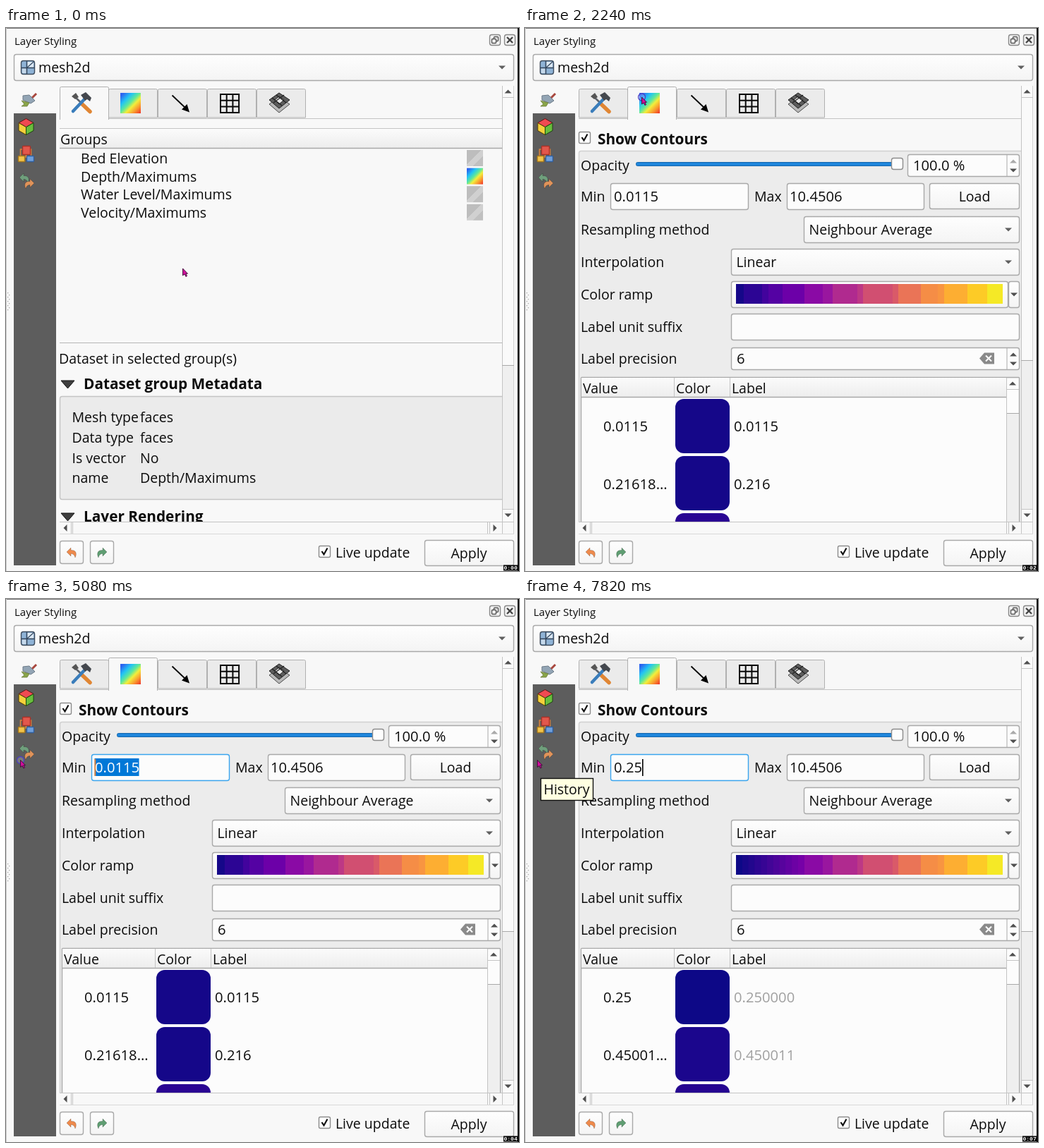
These frames come from a looping animation (727 px wide and 770 px high, 8 s). An HTML page:

```html
<!DOCTYPE html>
<html lang="en">
<head>
<meta charset="utf-8">
<title>Layer Styling</title>
<style>
  html, body { margin: 0; width: 100%; height: 100%; overflow: hidden; background: #f8f8f8; }
  svg { display: block; width: 727px; height: 770px; }
  text { font: 19.5px "Open Sans", "Noto Sans", sans-serif; fill: #0c0c0c; white-space: pre; }
  .num { font-size: 20.2px; }
  .bold { font-size: 20.8px; font-weight: 700; }
  .title { font-size: 15px; }
  .clock { font: 700 8px "Liberation Mono", monospace; fill: #fff; }
  .mid { text-anchor: middle; }
</style>
</head>
<body>
<svg id="stage" viewBox="0 0 727 770"></svg>
<script>
const LINE = '#a9a9a9', SOFT = '#c4c4c4', BG = '#f8f8f8', PANEL = '#ececec', FIELD = '#fcfcfc';

// Markup helpers
const attrs = o => Object.entries(o).map(([k, v]) => ` ${k}="${v}"`).join('');
const rect = (x, y, w, h, fill, stroke = 'none', rx = 0, more = {}) =>
  `<rect${attrs({ x, y, width: w, height: h, fill, stroke, rx, ...more })}/>`;
const box = (x, y, x2, y2, fill = FIELD, stroke = LINE, rx = 3, more = {}) =>
  rect(x + .5, y + .5, x2 - x - 1, y2 - y - 1, fill, stroke, rx, { 'stroke-width': 1.4, ...more });
const path = (d, fill = 'none', stroke = 'none', w = 1, more = {}) =>
  `<path${attrs({ d, fill, stroke, 'stroke-width': w, ...more })}/>`;
const line = (x1, y1, x2, y2, stroke = SOFT, w = 1) => path(`M${x1} ${y1}L${x2} ${y2}`, 'none', stroke, w);
const text = (x, y, s, cls = '', more = {}) => `<text${attrs({ x, y, class: cls, ...more })}>${s}</text>`;
const group = (id, body, more = {}) => `<g${attrs({ id, ...more })}>${body}</g>`;
const tri = (x, y, dx, dy, fill = '#4f4f4f') => dy
  ? path(`M${x - 5} ${y - dy * 2.5}h10l-5 ${dy * 5}z`, fill)
  : path(`M${x - dx * 2.5} ${y - 5}v10l${dx * 5} -5z`, fill);
const check = (x, y) => box(x, y, x + 17, y + 17, '#fff', '#8c8c8c', 2) +
  path(`M${x + 4.5} ${y + 8}l3 4.5l5 -9`, 'none', '#111', 2.2);
const combo = (x, y, x2, y2, s) => box(x, y, x2, y2, 'url(#btn)') +
  text(x + 7.5, y + 26, s) + tri(x2 - 16, (y + y2) / 2, 0, 1, '#606060');
const spin = (x, y, x2, y2, s, up) => box(x, y, x2, y2) + line(x2 - 18, y + 1, x2 - 18, y2 - 1, LINE) +
  tri(x2 - 9, y + 10, 0, -1, up) + tri(x2 - 9, y2 - 9, 0, 1) + text(x + 8, y + 23, s, 'num');

const defs = `<defs>
  <linearGradient id="btn" x2="0" y2="1"><stop stop-color="#fefefe"/><stop offset="1" stop-color="#f4f4f4"/></linearGradient>
  <linearGradient id="head" x2="0" y2="1"><stop stop-color="#fbfbfb"/><stop offset="1" stop-color="#ededed"/></linearGradient>
  <linearGradient id="rainbow" x2="1" y2="1">
    <stop offset=".08" stop-color="#2b62f0"/><stop offset=".3" stop-color="#22c4f4"/><stop offset=".48" stop-color="#5fe89a"/>
    <stop offset=".62" stop-color="#f2ee3c"/><stop offset=".8" stop-color="#fa9a2e"/><stop offset="1" stop-color="#ee2f2a"/>
  </linearGradient>
  <linearGradient id="grey" x2="1" y2="1">
    <stop offset=".45" stop-color="#bdbdbd"/><stop offset=".45" stop-color="#d0d0d0"/>
    <stop offset=".68" stop-color="#d0d0d0"/><stop offset=".68" stop-color="#c0c0c0"/>
  </linearGradient>
  <clipPath id="view"><rect x="75" y="130" width="628" height="570"/></clipPath>
</defs>`;

// Curved arrow used by history, undo and redo
const hook = (x, y, flip, color) => path('M-7 -1L-1 -7V-3.5C6 -4 8 1 5 7C4 3 2 1.5 -1 1.5V5z',
  color, '#0005', .6, { transform: `translate(${x} ${y}) scale(${flip} 1)` });

function frame() {
  const dots = [...Array(9)].map((_, i) => rect(2 + i % 2 * 2, 375 + i * 3, 1.3, 1.3, '#aaa')).join('');
  const mesh = box(21, 46, 41, 66, '#8fb3d6', '#3f4d5e', 3) + rect(30, 48, 9, 8, '#dce8f3') +
    rect(23, 57, 7, 7, '#c5d8ea') + line(29.5, 47, 29.5, 65, '#33475f', 1.6) + line(22, 56.5, 40, 56.5, '#33475f', 1.6) +
    line(30, 56, 39, 48, '#33475f', 1.2);
  const brush = path('M43 93L35 101', 'none', '#a8473d', 3) + path('M24 96l9 -1l8 8l-6 4l-11 -5z', '#93a5b5', '#6d7b88') +
    path('M22 103l11 3l-3 5l-8 0l4 -3z', '#8aa548', '#6d7d3d', .8);
  const cube = path('M28.500 128.500l10.500 6l-10.500 6l-10.500 -6z', '#f04a52', '#5b1715') +
    path('M18 134.500l10.500 6v11l-10.500 -6z', '#f5d03a', '#4d3c08') + path('M39 134.500l-10.500 6v11l10.500 -6z', '#68bd3d', '#1d4310');
  const tree = line(28.5, 178, 28.5, 184, '#e88b43', 2) + path('M20.500 183v-11h15v11', 'none', '#d9823c', 1.6) +
    box(23, 167, 35, 180, '#e2574c', '#a93228', 1) + box(17, 181, 27, 190, '#f2c44b', '#a97a1c', 1) +
    box(29, 181, 40, 190, '#6f9fdb', '#315f9d', 1);
  return rect(0, 0, 727, 770, BG) + line(0, .5, 727, .5, '#777') + line(.5, 0, .5, 770, '#ccc') +
    rect(725, 0, 2, 770, '#0a0a0a') + text(12, 24, 'Layer Styling', 'title') +
    box(685, 9, 701, 25, '#f2f2f2', '#888') + box(691, 12, 698, 19, 'none', '#555', 1) + box(688, 15, 695, 22, '#f2f2f2', '#555', 1) +
    box(706, 9, 722, 25, '#f2f2f2', '#888') + path('M710 13l8 8m0 -8l-8 8', 'none', '#444', 2.4) +
    box(11, 37, 720, 75, 'url(#btn)') + mesh + text(46, 63, 'mesh2d') + tri(703, 56, 0, 1, '#606060') +
    rect(11, 121, 60, 641, '#5d5d5d') + dots + brush + cube + tree +
    hook(26, 213, 1, '#6f9f7c') + hook(33, 221, -1, '#e0935a') +
    box(76, 727, 110, 760, 'url(#btn)') + hook(93, 744, 1, '#ee8a4c') +
    box(119, 727, 153, 760, 'url(#btn)') + hook(136, 744, -1, '#5f9e72') +
    check(443, 734) + text(467, 751, 'Live update') + box(593, 726, 720, 763, 'url(#btn)') + text(656, 752, 'Apply', 'mid');
}

const tabX = [76, 145, 215, 285, 355];
const tab = (i, on) => {
  const x = tabX[i] + .5, y = on ? 83.5 : 86.5, b = on ? 130 : 127;
  return path(`M${x} ${b}V${y + 2}q0 -2 2 -2h65q2 0 2 2V${b}${on ? '' : 'z'}`, on ? BG : '#ebebeb', '#b0b0b0');
};
const tabs = on => line(76, 128.5, 703, 128.5, SOFT) + tabX.map((_, i) => i === on ? '' : tab(i, 0)).join('') + tab(on, 1);

function tabIcons() {
  const grid = [0, 1, 2, 3].map(i => `M${304 + i * 8.7} 93v28M303 ${94 + i * 8.7}h28`).join('');
  return path('M97 97L119 118', 'none', '#5d6269', 2.5) + path('M108 108L119 118.500', 'none', '#e08634', 5.5, { 'stroke-linecap': 'round' }) +
    path('M113 99L95 118', 'none', '#3a7dbb', 4.5, { 'stroke-linecap': 'round' }) + path('M93 97l6 -5l4 6l-5 3z', '#555') +
    path('M106 95l7 -4l8 8l-2 5l-4 -3l-3 2z', '#44484e') +
    rect(162, 92, 29, 29, 'url(#rainbow)') +
    path('M235.500 95.500L255 114', 'none', '#000', 1.8) + path('M260 119.500l-11 -4l7.500 -7.500z', '#000') +
    path(grid, 'none', '#0a0a0a', 2) +
    path('M373 108l14 -10l15 10l-15 12z', '#b9b9b9', '#4c4c4c') + path('M373 102l14 -10l15 10l-15 12z', '#5d5d5d', '#222') +
    path('M381 102l6 -5l7 5l-7 6z', '#e9e9e9', '#222') + path('M377 99l14 11m-8 -15l14 11m-18 0l15 -11', 'none', '#222', 1.2);
}

const scroller = thumb => rect(703, 82, 17, 618, '#efefef') + rect(704, 82, 15, thumb - 82, '#fafafa') +
  line(703.5, 82, 703.5, 717, SOFT) + line(719.5, 82, 719.5, 717, '#d2d2d2') + line(703, 98.5, 720, 98.5) +
  line(703, thumb + .5, 720, thumb + .5, LINE) + rect(704, 682, 15, 18, '#fafafa') + line(703, 682.5, 720, 682.5) +
  tri(711.5, 90, 0, -1) + tri(711.5, 691, 0, 1) +
  line(76, 700.5, 720, 700.5) + line(76, 717.5, 720, 717.5, '#d8d8d8') +
  [92.5, 94.5, 682.5, 685.5].map(x => line(x, 701, x, 717)).join('') + tri(84, 709, -1, 0) + tri(693, 709, 1, 0);

function groupsPage() {
  const rows = ['Bed Elevation', 'Depth/Maximums', 'Water Level/Maximums', 'Velocity/Maximums'].map((s, i) =>
    text(106, 192 + i * 25.6, s) + rect(653, 173 + i * 25.6, 23, 23, i === 1 ? 'url(#rainbow)' : 'url(#grey)')).join('');
  const meta = [['Mesh type', 'faces'], ['Data type', 'faces'], ['Is vector', 'No'], ['name', 'Depth/Maximums']]
    .map(([k, v], i) => text(93.5, 559 + i * 28.8, k) + text(190, 559 + i * 28.8, v)).join('');
  const fold = (y, s) => path(`M78 ${y - 12}h19l-9.500 11z`, '#3e3e3e', '#111') + text(110, y, s, 'bold');
  const body = line(76, 142.5, 703, 142.5) + rect(76, 143, 627, 27, 'url(#head)') + text(77, 165, 'Groups') +
    line(76, 170.5, 703, 170.5, LINE, 1.5) + rows + line(76, 446.5, 703, 446.5, '#b5b5b5') +
    text(75, 476, 'Dataset in selected group(s)') + fold(512, 'Dataset group Metadata') +
    box(76, 522, 710, 669, '#ebebeb', SOFT) + meta + fold(700, 'Layer Rendering');
  return tabs(0) + group('a', body, { 'clip-path': 'url(#view)' }) + scroller(478);
}

const bands = [[299, '#150789'], [310, '#2c0594'], [336, '#42039d'], [345, '#5402a3'], [365, '#6c00a8'], [396, '#8a0aa5'],
  [422, '#99169f'], [436, '#b02a8f'], [471, '#bd3885'], [479, '#d14f71'], [521, '#d95a69'], [529, '#ea7457'],
  [561, '#f58d46'], [585, '#f89541'], [594, '#fdae32'], [627, '#fdcb26'], [655, '#f5e926'], [677]];
const ramp = () => bands.slice(0, -1).map(([x, c], i) => rect(x, 363, bands[i + 1][0] - x, 28, c)).join('');
const fineRamp = () => [...Array(11)].map((_, i) =>
  rect(299 + i * 8.8, 363, 9, 28, `rgb(${13 + i * 10.5},${8 - i * .7},${135 + i * 3.2})`)).join('');

function contoursPage() {
  const labels = [['Opacity', 202], ['Min', 246], ['Resampling method', 293], ['Interpolation', 339],
    ['Color ramp', 385], ['Label unit suffix', 431], ['Label precision', 476]].map(([s, y]) => text(79, y, s)).join('');
  const swatches = [526, 607, 688].map((y, i) => rect(213, y, 77, 77, '#150789', 'none', 12, { id: 'swatch' + i })).join('');
  const cells = [572, 654].map((y, i) =>
    text(111, y, '', 'num', { id: 'value' + i }) + text(296, y, '', 'num', { id: 'label' + i })).join('');
  const table = box(79, 495, 701, 720, FIELD, LINE, 1) + rect(80, 496, 602, 27, 'url(#head)') +
    line(80, 523.5, 682, 523.5, LINE, 1.5) + line(211.5, 496, 211.5, 523) + line(290.5, 496, 290.5, 523) +
    text(82, 518, 'Value') + text(214, 518, 'Color') + text(293, 518, 'Label') + swatches + cells +
    rect(683, 546, 16, 160, '#efefef') + line(682.5, 496, 682.5, 700, SOFT) + line(683, 512.5, 700, 512.5) +
    line(683, 546.5, 700, 546.5, LINE) + tri(691, 504, 0, -1);
  const body = check(76, 147) + text(103, 165, 'Show Contours', 'bold') + box(76, 174, 712, 740, PANEL, '#d0d0d0') + labels +
    rect(157.5, 190.5, 366, 5, '#1f86dc', '#1566ad', 2) + box(519, 184, 536, 201, '#fdfdfd', '#8d8d8d', 3) +
    spin(542, 179, 701, 211, '100.0 %', '#aaa') +
    box(121, 220, 317, 258, FIELD, LINE, 3, { id: 'field' }) + rect(125.5, 226, 63, 25, '#0078d7', 'none', 0, { id: 'mark' }) +
    text(126, 246, '', 'num', { id: 'entry' }) + rect(0, 227, 1.6, 24, '#000', 'none', 0, { id: 'caret' }) +
    text(325, 246, 'Max') + box(371, 220, 566, 258) + text(375, 246, '10.4506', 'num') +
    box(573, 220, 701, 257, 'url(#btn)') + text(637, 246, 'Load', 'mid') +
    combo(395, 267, 701, 305, 'Neighbour Average') + combo(292, 313, 701, 351, 'Linear') +
    box(292, 359, 685, 397, 'url(#btn)') + box(685, 359, 701, 397, 'url(#btn)') + tri(693, 378, 0, 1) +
    ramp() + group('fine', fineRamp()) + box(292, 405, 701, 443) + spin(292, 453, 701, 485, '6', '#4f4f4f') +
    path('M644 468.500l7 -8h14v16h-14z', '#8a8a8a') + path('M653 464.500l8 8m0 -8l-8 8', 'none', '#fff', 2) + table;
  return tabs(1) + group('b', body, { 'clip-path': 'url(#view)' }) + scroller(471);
}

const overlay = group('tip', box(22, 254, 97, 286, '#ffffe1', '#111', 0) + text(26.5, 277, 'History')) +
  group('mouse', '<circle id="ring" r="5" fill="#ffffff30" stroke="#4b3fc4" stroke-width="1.3"/>' +
    path('M0 0V10L2.600 8L4.400 11.500L6 10.700L4.400 7.300H7z', '#d0109c', '#3a0a35', .9)) +
  rect(705, 761.5, 20, 8, '#000') + text(705.5, 768.3, '', 'clock', { id: 'clock' });

document.getElementById('stage').innerHTML = defs + frame() +
  group('groups', groupsPage()) + group('contours', contoursPage()) + tabIcons() + overlay;

const el = {};
document.querySelectorAll('[id]').forEach(n => el[n.id] = n);

// Pointer position from each time on
const moves = [[0, 250.5, 341], [750, 247, 324], [870, 244, 303], [990, 224, 289], [1100, 199, 275], [1220, 181, 202],
  [1330, 169, 130], [1450, 165, 99], [1600, 165.5, 98], [3360, 166, 106], [3480, 168, 130], [3610, 170, 161],
  [3730, 171, 190], [3850, 184, 209], [3960, 201, 221], [4070, 212, 227], [4960, 110, 228], [5080, 20.5, 228.5],
  [5280, 17.5, 228.5]];

const seconds = [0, 990, 1970, 2990, 3960, 5180, 6300, 7300];

// Everything else: changes merged in order of time
const changes = [
  [0, { page: 0, ring: 0, focus: 0, mark: null, caret: null, tip: 0, entry: '0.0115', live: 0,
        rows: ['0.0115', '0.21618...', '0.0115', '0.216'] }],
  [2240, { page: 1, ring: 1 }],
  [2490, { ring: 0 }],
  [4190, { ring: 1 }],
  [4810, { focus: 1, caret: 189 }],
  [4960, { mark: 125.5, caret: 125.5 }],
  [5280, { ring: 0 }],
  [5920, { caret: null }],
  [6200, { mark: null, entry: '0', caret: 137, tip: 1, live: 1, rows: ['0', '0.20491...', '0.000000', '0.204913'] }],
  [6670, { entry: '0.', caret: 142.5 }],
  [7170, { entry: '0.2', caret: 154, rows: ['0.2', '0.40099...', '0.200000', '0.400992'] }],
  [7820, { entry: '0.25', caret: 166, rows: ['0.25', '0.45001...', '0.250000', '0.450011'] }],
];

const show = (n, on) => n.style.display = on ? '' : 'none';
const put = (n, s) => { if (n.textContent !== s) n.textContent = s; };

function draw(t) {
  const s = Object.assign({}, ...changes.filter(c => c[0] <= t).map(c => c[1]));
  const [, x, y] = moves.filter(m => m[0] <= t).pop();
  el.mouse.setAttribute('transform', `translate(${x} ${y})`);
  show(el.groups, !s.page);
  show(el.contours, s.page);
  show(el.ring, s.ring);
  show(el.tip, s.tip);
  show(el.fine, s.live);
  show(el.mark, s.mark !== null);
  show(el.caret, s.caret !== null);
  if (s.caret !== null) el.caret.setAttribute('x', s.caret);
  el.caret.setAttribute('fill', s.mark !== null ? '#ff8728' : '#000');
  el.field.setAttribute('stroke', s.focus ? '#3aa5ee' : LINE);
  el.entry.style.fill = s.mark !== null ? '#fff' : '';
  put(el.entry, s.entry);
  ['value0', 'value1', 'label0', 'label1'].forEach((id, i) => {
    put(el[id], s.rows[i]);
    if (i > 1) el[id].style.fill = s.live ? '#a0a0a0' : '';
  });
  (s.live ? ['#0d0887', '#1b068d', '#260591'] : ['#150789', '#150789', '#2a0593'])
    .forEach((c, i) => el['swatch' + i].setAttribute('fill', c));
  put(el.clock, '0:0' + (seconds.filter(v => v <= t).length - 1));
}

const start = performance.now();
function tick() {
  draw((performance.now() - start) % 8000);
  requestAnimationFrame(tick);
}
draw(0);
requestAnimationFrame(tick);
</script>
</body>
</html>
```
